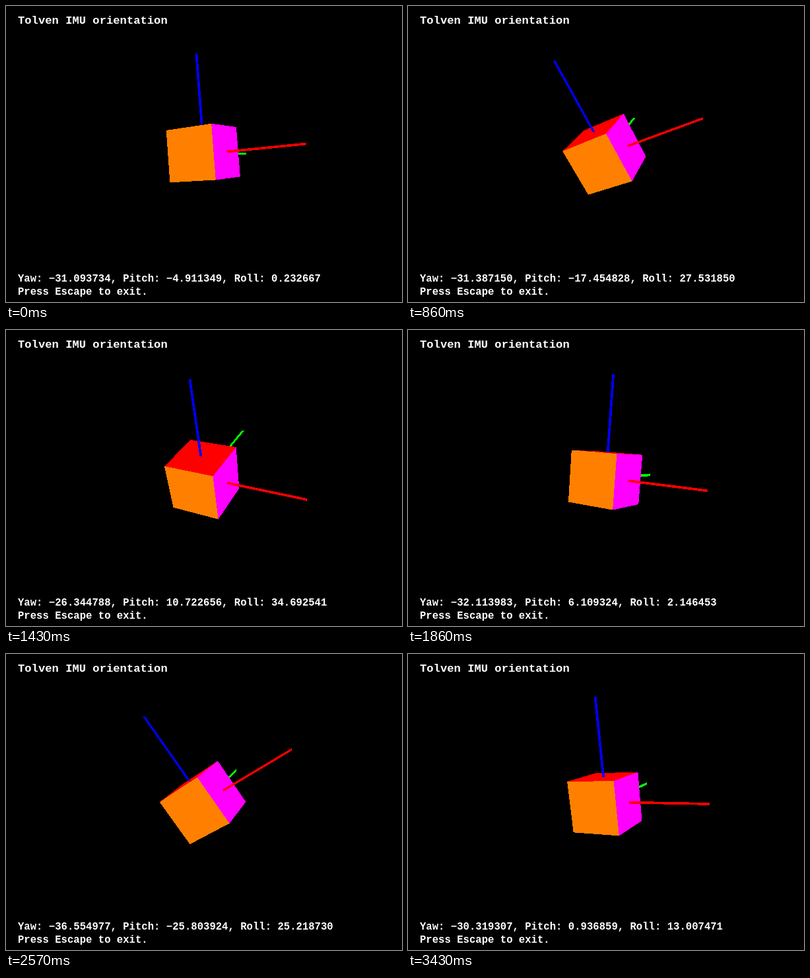
Recreate the animation shown at these times as an HTML page. Size 600 by 450 pixels, loop 3570 ms.

```html
<!DOCTYPE html>
<html lang="en">
<head>
<meta charset="utf-8">
<title>IMU orientation</title>
<style>
  html, body { margin: 0; width: 100%; height: 100%; overflow: hidden; background: #000; }
  svg { display: block; width: 600px; height: 450px; }
  text { fill: #fff; font: bold 15.62px "Liberation Mono", monospace; }
  #title { font-size: 17.18px; }
</style>
</head>
<body>
<svg viewBox="0 0 600 450">
  <g id="scene" shape-rendering="crispEdges"></g>
  <text id="title" x="18" y="26.5">Tolven IMU orientation</text>
  <text id="readout" x="18" y="418.5"></text>
  <text x="18" y="439">Press Escape to exit.</text>
</svg>
<script>
const LOOP = 3570;
const STEPS = 25;
const FOCAL = 225 / Math.tan(Math.PI / 8);  // 45 degree field of view
const DISTANCE = 14;                        // in half cube edges
const AXIS_LENGTH = 4;
const LINE_WIDTH = 3.75;

// Turning points of the hand movement; angles in degrees
const keyPoses = [
  { step: 0, angles: [-31.093734, -4.911349, 0.232667] },
  { step: 1, angles: [-31.541208, -12.036417, 28.514362] },
  { step: 3, angles: [-31.628417, 4.018264, 43.216579] },
  { step: 6, angles: [-31.387150, -17.454828, 27.531850] },
  { step: 8, angles: [-25.518274, 1.526418, 44.013752] },
  { step: 10, angles: [-26.344788, 10.722656, 34.692541] },
  { step: 13, angles: [-32.113983, 6.109324, 2.146453] },
  { step: 15, angles: [-34.813265, -20.518374, 18.024617] },
  { step: 18, angles: [-36.554977, -25.803924, 25.218730] },
  { step: 20, angles: [-24.763717, -14.532925, 41.137330] },
  { step: 24, angles: [-30.319307, 0.936859, 13.007471] }
];

// Key pose by number, repeating past both ends of the loop
function keyAt(number) {
  const turns = Math.floor(number / keyPoses.length);
  const { step, angles } = keyPoses[number - turns * keyPoses.length];
  return { step: step + turns * STEPS, angles };
}

// Smooth curve through the key poses: yaw, pitch, roll at a step
function readingAt(step) {
  const number = keyPoses.filter(key => key.step <= step).length - 1;
  const [before, from, to, after] = [-1, 0, 1, 2].map(offset => keyAt(number + offset));
  const span = to.step - from.step;
  const t = (step - from.step) / span;
  const ease = t * t * (3 - 2 * t);
  return from.angles.map((start, i) => {
    const end = to.angles[i];
    const startSlope = (end - before.angles[i]) / (to.step - before.step);
    const endSlope = (after.angles[i] - start) / (after.step - from.step);
    const bend = t * (1 - t) * ((1 - t) * startSlope - t * endSlope);
    return start + (end - start) * ease + span * bend;
  });
}

// Body axes: x right, y away from the viewer, z up
const faces = [
  { color: "#ff8000", corners: [[-1, -1, -1], [1, -1, -1], [1, -1, 1], [-1, -1, 1]] },
  { color: "#f0f", corners: [[1, -1, -1], [1, 1, -1], [1, 1, 1], [1, -1, 1]] },
  { color: "#f00", corners: [[-1, -1, 1], [1, -1, 1], [1, 1, 1], [-1, 1, 1]] }
];
const axes = [
  { color: "#0f0", direction: [0, 1, 0] },
  { color: "#00f", direction: [0, 0, 1] },
  { color: "#f00", direction: [1, 0, 0] }
];

function spin(a, b, angle) {
  const c = Math.cos(angle), s = Math.sin(angle);
  return [a * c - b * s, a * s + b * c];
}

function rotate([x, y, z], [yaw, pitch, roll]) {
  [y, z] = spin(y, z, roll);
  [z, x] = spin(z, x, pitch);
  [x, y] = spin(x, y, yaw);
  return [x, y, z];
}

function project([x, y, z]) {
  const scale = FOCAL / (DISTANCE + y);
  return [300 + x * scale, 225 - z * scale];
}

function polygon(points, color) {
  const list = points.map(p => p.map(v => v.toFixed(2)).join()).join(" ");
  return `<polygon points="${list}" fill="${color}"/>`;
}

// Wide lines have ends cut along the screen axis they cross
function line([x1, y1], [x2, y2], color) {
  const steep = Math.abs(y2 - y1) > Math.abs(x2 - x1);
  const dx = steep ? LINE_WIDTH / 2 : 0;
  const dy = steep ? 0 : LINE_WIDTH / 2;
  return polygon([
    [x1 - dx, y1 - dy], [x2 - dx, y2 - dy],
    [x2 + dx, y2 + dy], [x1 + dx, y1 + dy]
  ], color);
}

function isFront([a, b, c]) {
  return (b[0] - a[0]) * (c[1] - a[1]) < (b[1] - a[1]) * (c[0] - a[0]);
}

function sceneMarkup(degrees) {
  const angles = degrees.map(d => d * Math.PI / 180);
  const place = p => project(rotate(p, angles));
  let behind = "", cube = "", ahead = "";

  for (const { color, corners } of faces) {
    const points = corners.map(place);
    if (isFront(points)) cube += polygon(points, color);
  }
  for (const { color, direction } of axes) {
    const tip = direction.map(v => v * AXIS_LENGTH);
    const markup = line(place(direction), place(tip), color);
    const facesViewer = -DISTANCE * rotate(direction, angles)[1] > 1;
    if (facesViewer) ahead += markup; else behind += markup;
  }
  return behind + cube + ahead;
}

const scene = document.getElementById("scene");
const readout = document.getElementById("readout");
let shown = -1;

function frame() {
  // Steps begin on whole hundredths of a second
  const time = performance.now() % LOOP;
  let step = STEPS - 1;
  while (Math.round(step * 100 / 7) * 10 > time) step--;

  if (step !== shown) {
    shown = step;
    const reading = readingAt(step);
    const [yaw, pitch, roll] = reading.map(v => v.toFixed(6).replace("-", "\u2212"));
    scene.innerHTML = sceneMarkup(reading);
    readout.textContent = `Yaw: ${yaw}, Pitch: ${pitch}, Roll: ${roll}`;
  }
  requestAnimationFrame(frame);
}
frame();
</script>
</body>
</html>
```
